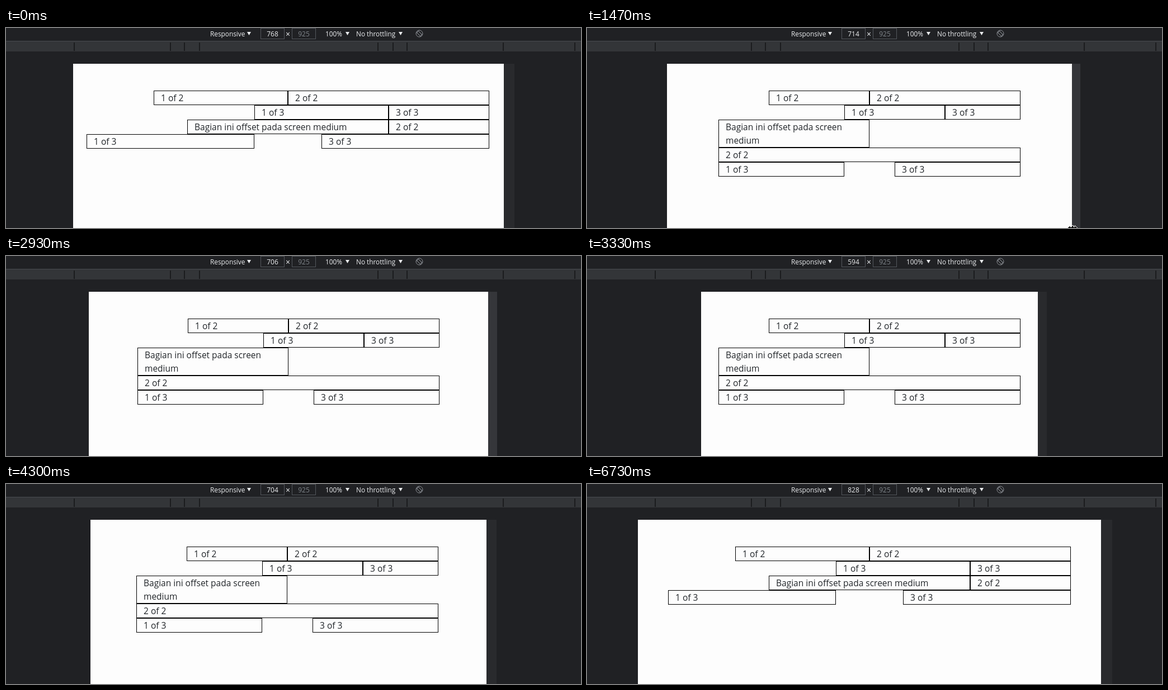
An HTML page that plays this animation: 1028x358 px, repeating every 6.76 s.

```html
<!DOCTYPE html>
<html lang="id">
<head>
<meta charset="utf-8">
<title>Responsive grid</title>
<style>
  html, body { margin: 0; width: 100%; height: 100%; overflow: hidden; background: #202124; }
  #stage {
    position: relative; width: 1028px; height: 358px; overflow: hidden;
    background: #202124; font-family: "Open Sans", "Noto Sans", sans-serif;
  }
  #stage > * { position: absolute; }

  .tool { top: 0; height: 21px; line-height: 21px; font-size: 11.8px; color: #eceef0; white-space: nowrap; }
  .arrow {
    top: 7px; width: 7px; height: 6px; background: #eceef0;
    clip-path: polygon(0 0, 100% 0, 50% 100%);
  }
  .field {
    top: 0; width: 43px; height: 20px; line-height: 20px; box-sizing: border-box;
    border: 1px solid #53575c; font-size: 12px; text-align: center; color: #eceef0;
  }
  .dim { color: #80868b; }
  #icon { left: 731px; top: 2px; }

  #ruler { left: 0; top: 23px; width: 1028px; height: 19px; background: #333538; border-top: 1px solid #494c50; box-sizing: border-box; }
  #ruler i { position: absolute; top: 2px; width: 2px; height: 15px; background: #1b1c1e; }

  #grip { top: 64px; width: 20px; height: 294px; background: #292a2d; }
  #grip.hot { background: #35363a; }
  #page { top: 64px; height: 294px; overflow: hidden; background: #fdfdfd; }

  #view { container-type: inline-size; height: 294px; }
  .box { margin: 0 auto; padding-top: 48px; width: 100%; }
  .row { display: flex; }
  .wrap { flex-wrap: wrap; }
  .col {
    flex: none; box-sizing: border-box; border: 1px solid #000; padding: 0 12px;
    width: calc(100% * var(--n) / 12); margin-left: calc(100% * var(--o, 0) / 12);
    font-size: 15.5px; line-height: 24px; color: #212529;
  }
  .big { --n: 6; --m: 6; --mo: 3; }
  .side { --n: 12; --m: 3; }
  @container (min-width: 576px) { .box { width: 540px; } }
  @container (min-width: 768px) {
    .box { width: 720px; }
    .col.md { --n: var(--m); --o: var(--mo, 0); }
  }
  #cursor { top: 351px; }
</style>
</head>
<body>
<div id="stage">
  <span class="tool" style="left:365px">Responsive</span><i class="arrow" style="left:431px"></i>
  <div class="field" id="size" style="left:455px">768</div>
  <span class="tool" style="left:500px;font-size:14px">×</span>
  <div class="field dim" style="left:511px">925</div>
  <span class="tool" style="left:571px">100%</span><i class="arrow" style="left:607px"></i>
  <span class="tool" style="left:626px">No throttling</span><i class="arrow" style="left:702px"></i>
  <svg id="icon" width="16" height="16" fill="none" stroke="#8d9196">
    <circle cx="8" cy="8" r="6"/>
    <rect x="6" y="3.500" width="4" height="9" transform="rotate(-45 8 8)"/>
  </svg>
  <div id="ruler"></div>
  <div id="grip"></div>
  <div id="page"><div id="view"><div class="box">
    <div class="row">
      <div class="col" style="--n:4;--o:2">1 of 2</div>
      <div class="col" style="--n:6">2 of 2</div>
    </div>
    <div class="row">
      <div class="col" style="--n:4;--o:5">1 of 3</div>
      <div class="col" style="--n:3">3 of 3</div>
    </div>
    <div class="row wrap">
      <div class="col md big">Bagian ini offset pada screen medium</div>
      <div class="col md side">2 of 2</div>
    </div>
    <div class="row">
      <div class="col" style="--n:5">1 of 3</div>
      <div class="col" style="--n:5;--o:2">3 of 3</div>
    </div>
  </div></div></div>
  <svg id="cursor" width="20" height="14" fill="#000" stroke="#fff">
    <path d="M1 7 6 2.500V5H8.500V2.500H11.500V5H14V2.500L19 7 14 11.500V9H6V11.500Z"/>
  </svg>
</div>
<script>
const LOOP = 6760, MID = 505;
// Dragged viewport width: [ms, px]
const drag = [
  [0, 768], [350, 804], [730, 776], [1200, 764], [1430, 728], [1470, 714],
  [1650, 660], [1950, 600], [2200, 600], [2650, 744], [2780, 746], [2900, 714],
  [2930, 706], [3200, 630], [3500, 548], [3640, 526], [3740, 526], [3800, 538],
  [4200, 668], [4300, 704], [4400, 744], [4560, 800], [4800, 832], [5050, 836],
  [5350, 828], [LOOP, 828]
];
const el = id => document.getElementById(id);
const [size, ruler, grip, page, view, cursor] =
  ["size", "ruler", "grip", "page", "view", "cursor"].map(el);

for (const w of [320, 374, 424, 768, 1024])
  for (const x of [MID - w / 2, MID + w / 2 - 1]) {
    const tick = document.createElement("i");
    tick.style.left = x + "px";
    ruler.append(tick);
  }

function widthAt(t) {
  t = Math.min(Math.max(t, 0), LOOP);
  const k = Math.max(1, drag.findIndex(p => p[0] >= t));
  const [t0, a] = drag[k - 1], [t1, b] = drag[k];
  return Math.round((a + (b - a) * (t - t0) / (t1 - t0)) / 2) * 2;
}

function draw(now) {
  const t = now % LOOP;
  const w = widthAt(t);
  // The page trails the handle when shrinking and leads it when growing
  const layout = Math.max(w, widthAt(t - 30));
  const full = Math.max(layout, widthAt(t + 10));

  size.textContent = w;
  grip.style.left = MID + w / 2 + "px";
  grip.classList.toggle("hot", t > 1000 && t < 3300);
  page.style.left = MID - full / 2 + "px";
  page.style.width = full + "px";
  view.style.width = layout + (layout < 576 ? 2 : 0) + "px";
  cursor.style.left = MID + full / 2 - 9 + "px";
  cursor.style.display = t > 1200 && t < 2000 ? "block" : "none";
  requestAnimationFrame(draw);
}
requestAnimationFrame(draw);
</script>
</body>
</html>
```
